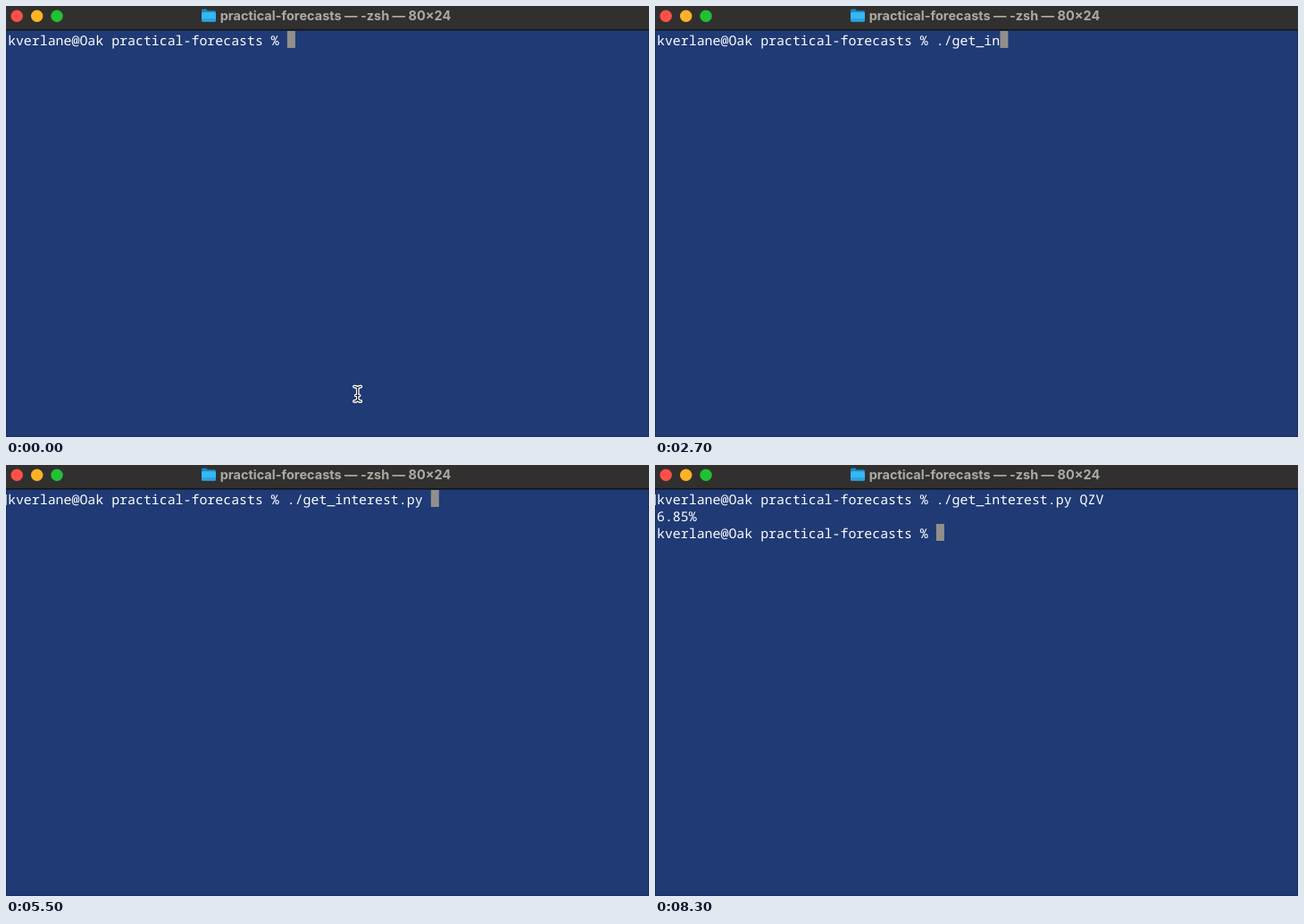
Write an HTML page that moves like this. It is 720x483 px and loops after 8.4 s.

```html
<!DOCTYPE html>
<html lang="en">
<head>
<meta charset="utf-8">
<title>Terminal</title>
<style>
  html, body { margin: 0; width: 100%; height: 100%; overflow: hidden; background: #1f3a74; }
  #stage { position: relative; width: 720px; height: 483px; overflow: hidden; background: #1f3a74; }
  #stage > svg { position: absolute; left: 0; top: 0; }
  #bar {
    position: absolute; left: 0; top: 0; width: 717px; height: 21px;
    display: flex; align-items: center; justify-content: center; gap: 5px;
    font: 700 14.5px/21px Inter, Roboto, "Liberation Sans", sans-serif;
    color: #acaaa7; white-space: pre;
  }
  #folder { flex: none; }
  .busy #folder { opacity: .5; }
  #busyDot { visibility: hidden; }
  .busy #busyDot { visibility: visible; }
  .row {
    font: 500 14.9px "Noto Sans Mono", "DejaVu Sans Mono", monospace;
    fill: #fff; white-space: pre; text-rendering: geometricPrecision;
  }
</style>
</head>
<body>
<div id="stage">
  <svg width="720" height="483" viewBox="0 0 720 483">
    <rect width="720" height="26" fill="#31302e"/>
    <rect y="26" width="720" height="1.5" fill="#111518"/>
    <path d="M.5 28V482.5H719.5V28" fill="none" stroke="#183060"/>
    <circle cx="12.2" cy="11.2" r="6.7" fill="#fe5048"/>
    <circle id="busyDot" cx="12.2" cy="11.2" r="1.9" fill="#750f0b"/>
    <circle cx="34.7" cy="11.2" r="6.7" fill="#feb225"/>
    <circle cx="57" cy="11.2" r="6.7" fill="#20c234"/>
    <rect id="cursor" width="9" height="19" fill="#918f8c"/>
    <rect id="mark" y="33" width="1" height="12" fill="#fff" opacity=".65"/>
    <text class="row" x="2" y="44"></text>
    <text class="row" x="2" y="63"></text>
    <text class="row" x="2" y="82"></text>
    <g id="pointer" fill="none" stroke-linecap="round">
      <path id="beam" d="M390 426.5Q393.7 426.5 393.7 429.5Q393.7 426.5 397.4 426.5M393.7 429.5V440M390 443Q393.7 443 393.7 440Q393.7 443 397.4 443M391.8 436.5H395.6" stroke="#fff" stroke-width="3.4"/>
      <use href="#beam"/>
      <path d="M390 426.5Q393.7 426.5 393.7 429.5Q393.7 426.5 397.4 426.5M393.7 429.5V440M390 443Q393.7 443 393.7 440Q393.7 443 397.4 443M391.8 436.5H395.6" stroke="#10151f" stroke-width="1.2"/>
    </g>
  </svg>
  <div id="bar">
    <svg id="folder" width="16" height="15" viewBox="0 0 16 15">
      <path d="M0 2Q0 .5 1.5 .5H5.2L7 2.2H14.5Q16 2.2 16 3.7V8H0Z" fill="#1688c8"/>
      <rect y="4" width="16" height="10.6" rx="1.5" fill="#35b7f1"/>
      <path d="M0 11H16V13.1Q16 14.6 14.5 14.6H1.5Q0 14.6 0 13.1Z" fill="#27a3e2"/>
    </svg>
    <span id="title"></span>
  </div>
</div>
<script>
  const LOOP = 8400, LEFT = 2, TOP = 28, CELL = 8.94, LINE = 19;
  const DIR = "practical-forecasts";
  const PROMPT = `kverlane@Oak ${DIR} % `;
  const COMMAND = "./get_interest.py QZV";

  // Moment at which each character of the command appears
  const KEYS = [
    900, 1100, 1300, 1400, 1600, 1900, 2200, 2500, 2800, 3100, 3400,
    3600, 3800, 4000, 4500, 4700, 5000, 5300, 5700, 6000, 6300
  ];
  const ENTER = 6800, DONE = 7700, MARKED = 3600;

  const $ = id => document.getElementById(id);
  const stage = $("stage"), cursor = $("cursor"), title = $("title");
  const rows = [...document.querySelectorAll(".row")];

  function setText(node, text) {
    if (node.textContent !== text) node.textContent = text;
  }

  function show(node, on) {
    node.setAttribute("visibility", on ? "visible" : "hidden");
  }

  function draw(t) {
    const typed = COMMAND.slice(0, KEYS.filter(k => k <= t).length);
    const lines = [PROMPT + typed];
    if (t >= DONE) lines.push("6.85%", PROMPT);
    else if (t >= ENTER) lines.push("");

    rows.forEach((row, i) => setText(row, lines[i] || ""));
    const last = lines.length - 1;
    cursor.setAttribute("x", LEFT + lines[last].length * CELL);
    cursor.setAttribute("y", TOP + last * LINE);

    const busy = t >= ENTER && t < DONE;
    stage.classList.toggle("busy", busy);
    setText(title, `${DIR} — ${busy ? COMMAND.slice(2) : "-zsh"} — 80×24`);
    show($("pointer"), t < KEYS[0]);
    show($("mark"), t >= MARKED);
  }

  const start = performance.now();
  function tick() {
    draw((performance.now() - start) % LOOP);
    requestAnimationFrame(tick);
  }
  tick();
</script>
</body>
</html>
```
